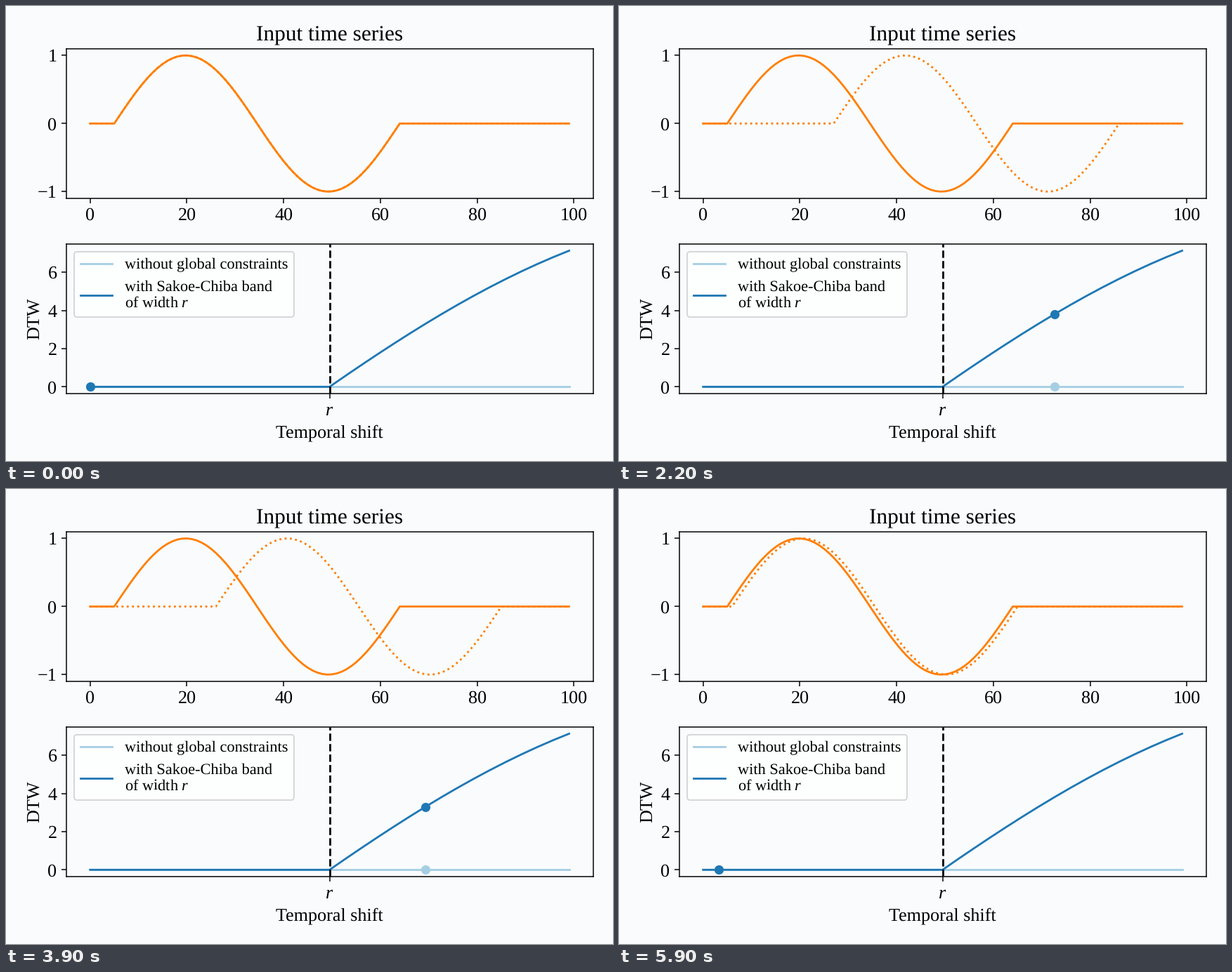
Write a matplotlib script that moves like this. It is 864 by 648 pixels and loops after 6000 ms.

```python
import numpy as np
import matplotlib.pyplot as plt
from matplotlib.animation import FuncAnimation

W, H, DPI = 864, 648, 135
BACKGROUND = "#f9fbfd"
ORANGE, LIGHT_BLUE, DARK_BLUE = "#ff7f00", "#a6cee3", "#1f78b4"
LENGTH, WAVE_START, WAVE_LENGTH = 100, 5, 60
MAX_SHIFT, RADIUS = 30, 15
N_FRAMES = 2 * MAX_SHIFT

plt.rcParams.update({
    "font.family": "Liberation Serif",
    "font.size": 13.95,
    "text.hinting": "none",
    "mathtext.fontset": "custom",
    "mathtext.rm": "Liberation Serif",
    "mathtext.it": "Liberation Serif:italic",
})


def series(shift):
    """One sine period, delayed by shift samples and padded with zeros."""
    values = np.zeros(LENGTH)
    start = WAVE_START + shift
    values[start:start + WAVE_LENGTH] = np.sin(np.linspace(0, 2 * np.pi, WAVE_LENGTH))
    return values


def banded_dtw(shift):
    """The band absorbs up to RADIUS samples of delay; the rest is paid for."""
    return np.linalg.norm(series(0) - series(max(shift - RADIUS, 0)))


def add_axes(left, top, right, bottom):
    box = [left / W, 1 - bottom / H, (right - left) / W, (bottom - top) / H]
    return fig.add_axes(box, facecolor=BACKGROUND)


fig = plt.figure(figsize=(W / DPI, H / DPI), dpi=DPI, facecolor=BACKGROUND)
time = np.arange(LENGTH)
shifts = np.arange(MAX_SHIFT + 1)
dtw = np.array([banded_dtw(s) for s in shifts])

top_ax = add_axes(85.6, 60.7, 835.6, 274)
top_ax.set_title("Input time series")
top_ax.plot(time, series(0), color=ORANGE)
shifted, = top_ax.plot(time, series(0), color=ORANGE, linestyle=":")
top_ax.set_xticks(range(0, 101, 20))
top_ax.set_yticks([-1, 0, 1])
top_ax.set_xlim(-4.95, 103.95)
top_ax.set_ylim(-1.1, 1.1)

low_ax = add_axes(85.6, 338.8, 835.6, 552)
low_ax.plot(shifts, np.zeros(len(shifts)), color=LIGHT_BLUE,
            label="without global constraints")
low_ax.plot(shifts, dtw, color=DARK_BLUE,
            label="with Sakoe-Chiba band\nof width $r$")
free_dot, = low_ax.plot([0], [0], "o", color=LIGHT_BLUE)
band_dot, = low_ax.plot([0], [0], "o", color=DARK_BLUE)
low_ax.axvline(RADIUS, color="k", linestyle="--")
low_ax.set_xticks([RADIUS], ["$r$"])
low_ax.set_yticks([0, 2, 4, 6])
low_ax.set_xlim(-0.05 * MAX_SHIFT, 1.05 * MAX_SHIFT)
low_ax.set_ylim(-0.05 * dtw[-1], 1.05 * dtw[-1])
low_ax.set_xlabel("Temporal shift")
low_ax.set_ylabel("DTW")
low_ax.legend(loc="upper left", fontsize=11.96)


def update(frame):
    shift = min(frame, N_FRAMES - frame)
    shifted.set_ydata(series(shift))
    free_dot.set_data([shift], [0])
    band_dot.set_data([shift], [dtw[shift]])
    return shifted, free_dot, band_dot


anim = FuncAnimation(fig, update, frames=N_FRAMES, interval=100, repeat=True)
plt.show()
```
